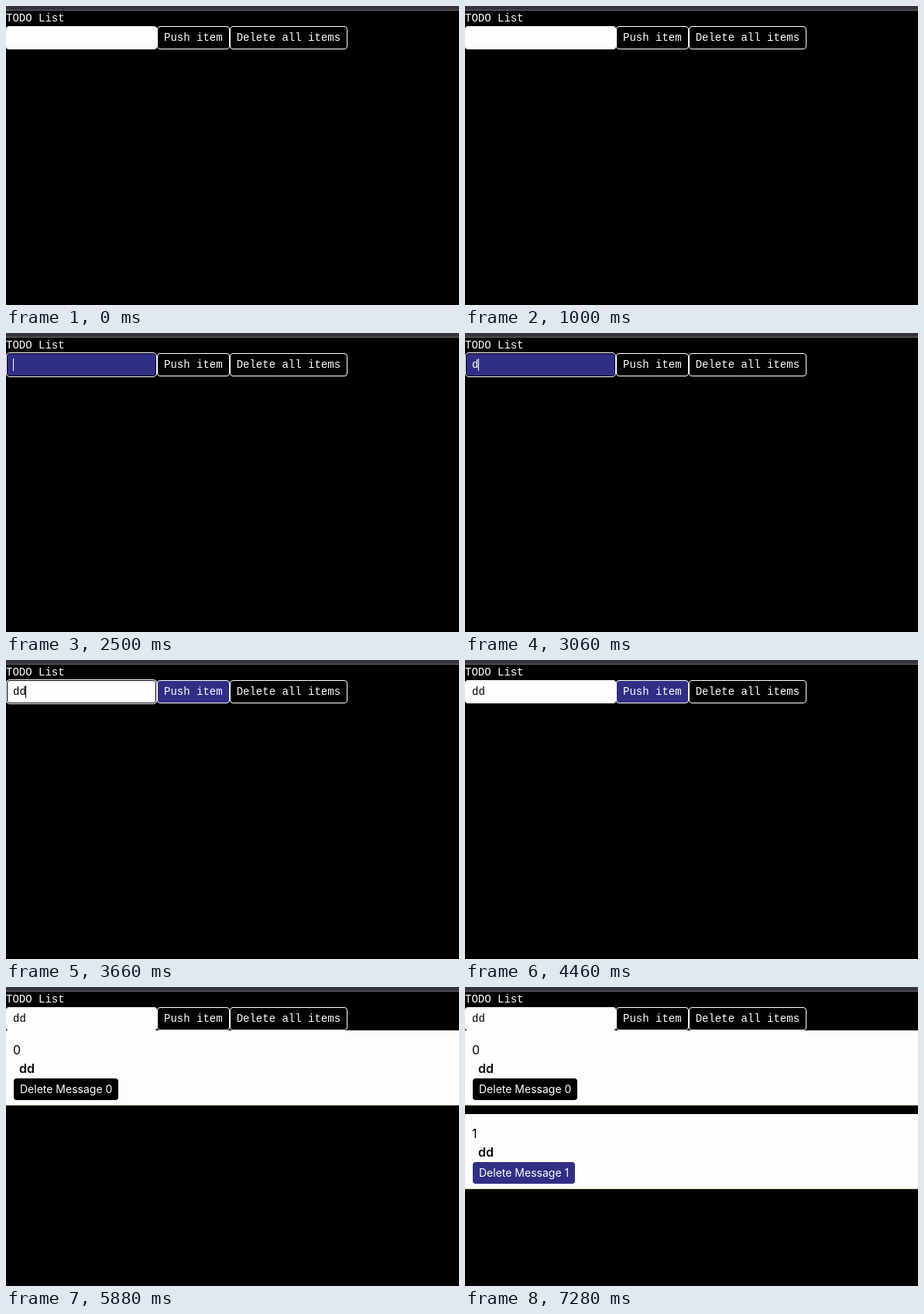
An HTML page for the animation above (8000 ms loop, 585x386 px).

```html
<!DOCTYPE html>
<html lang="en">
<head>
<meta charset="utf-8">
<title>TODO List</title>
<style>
  :root { --loop: 8s step-end infinite; --hover: #312e85; --paper: #fdfdff; }
  * { box-sizing: border-box; }
  html, body { margin: 0; width: 100%; height: 100%; overflow: hidden; background: #000; }
  #stage {
    position: relative; width: 585px; height: 386px; overflow: hidden; background: #000; color: #fff;
    font: 14px/20px "Liberation Mono", "Courier New", monospace; white-space: pre;
  }
  #stage > * { position: absolute; }

  .strip { left: 0; top: 0; width: 585px; height: 6px; background: #35343c; border-bottom: 1px solid #66656c; }
  .title { left: 0; top: 6px; }
  .form { left: 0; top: 26px; display: flex; height: 30px; }
  .btn { padding: 4px 8px; border: 1px solid #fff; border-radius: 4px; background: #000; }
  .push { animation: push var(--loop); }

  .field {
    position: relative; width: 195px; height: 30px; padding: 5px 9px; border-radius: 4px;
    background: var(--paper); color: #000; animation: field var(--loop);
  }
  .ring {
    position: absolute; left: 0; top: -1px; width: 195px; height: 32px; border-radius: 5px;
    border: 1.5px solid #fff; box-shadow: inset 0 0 0 1px #000; visibility: hidden;
    animation: ring var(--loop);
  }
  .field b { font-weight: 400; visibility: hidden; }
  .d1 { animation: d1 var(--loop); }
  .d2 { animation: d2 var(--loop); }
  .caret {
    position: absolute; left: 9px; top: 7px; width: 1px; height: 16px; background: currentColor;
    visibility: hidden; animation: caret var(--loop), caretX var(--loop);
  }

  .card {
    left: 0; width: 585px; height: 97px; background: var(--paper); color: #000;
    border-bottom: 1px solid #d6d6a8; font: 16px/24px Inter, sans-serif; visibility: hidden;
  }
  .card > * { position: absolute; }
  .num { left: 9px; top: 13px; }
  .msg { left: 17px; top: 37px; font-weight: 600; }
  .del {
    left: 10px; top: 62px; height: 28px; padding: 4px 8px; border-radius: 4px;
    background: #000; color: #fff; font-size: 14px; line-height: 20px;
  }
  .first { top: 56px; animation: first var(--loop); }
  .second { top: 164px; animation: second var(--loop); }
  .second .del { animation: del var(--loop); }

  @keyframes field {
    23.75% { background: var(--hover); color: #fff; }
    42.5%, 100% { background: var(--paper); color: #000; }
  }
  @keyframes ring { 29.5% { visibility: visible; } 54.25%, 100% { visibility: hidden; } }
  @keyframes d1 { 37%, 100% { visibility: visible; } }
  @keyframes d2 { 40%, 100% { visibility: visible; } }
  @keyframes caret {
    29.5%, 37%, 52.5% { visibility: visible; }
    35.75%, 46.25%, 54.25%, 100% { visibility: hidden; }
  }
  @keyframes caretX { 37% { left: 17px; } 40%, 100% { left: 25px; } }
  @keyframes push {
    43.75%, 78.75% { background: var(--hover); }
    61.25%, 80.25%, 100% { background: #000; }
  }
  @keyframes first { 58%, 100% { visibility: visible; } }
  @keyframes second { 80.25%, 100% { visibility: visible; } }
  @keyframes del { 90.75%, 100% { background: var(--hover); } }
</style>
</head>
<body>
<div id="stage">
  <div class="strip"></div>
  <div class="title">TODO List</div>
  <div class="form"><div class="field"><b class="d1">d</b><b class="d2">d</b><i class="caret"></i><i class="ring"></i></div><div class="btn push">Push item</div><div class="btn">Delete all items</div></div>
  <div class="card first"><span class="num">0</span><span class="msg">dd</span><span class="del">Delete Message 0</span></div>
  <div class="card second"><span class="num">1</span><span class="msg">dd</span><span class="del">Delete Message 1</span></div>
</div>
</body>
</html>
```
